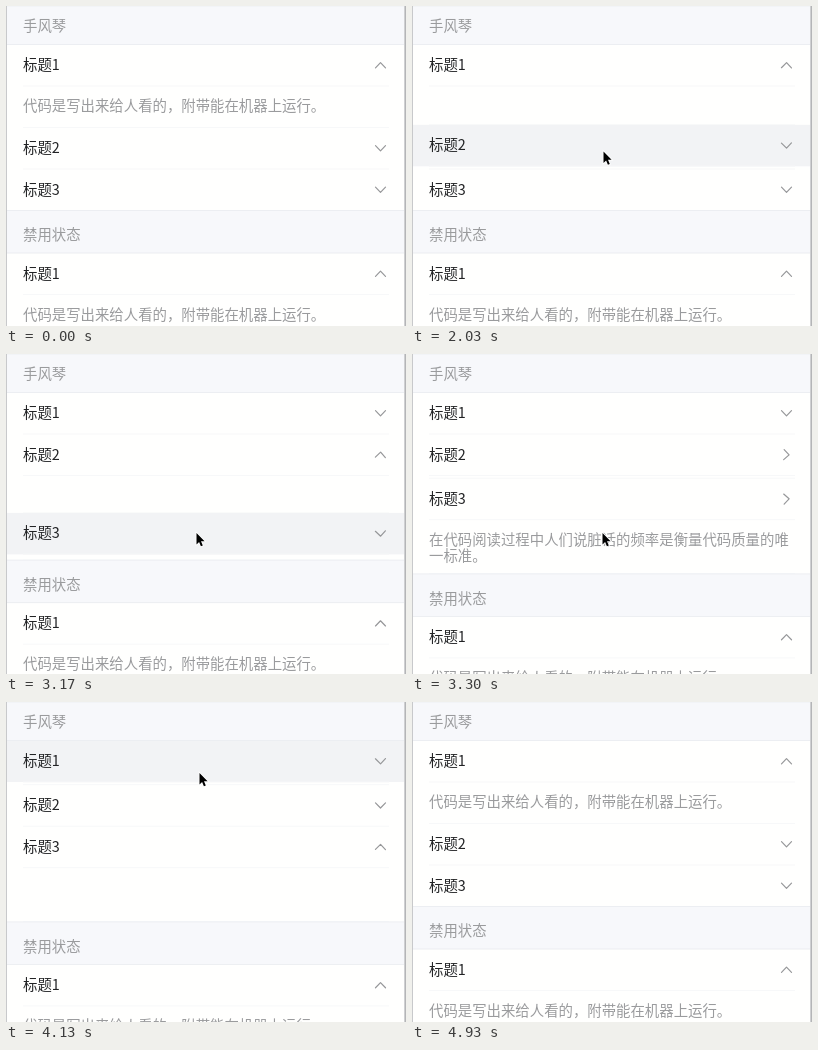
Write an HTML page that moves like this. It is 400 px wide and 320 px high and loops after 5900 ms.

```html
<!DOCTYPE html>
<html lang="zh-CN">
<head>
<meta charset="utf-8">
<title>折叠面板</title>
<style>
  html, body { margin: 0; width: 100%; height: 100%; overflow: hidden; background: #fffffe; }
  svg { display: block; }
  text { font: 14.4px "Noto Sans CJK SC", "Noto Sans CJK", "Noto Sans", sans-serif; fill: #9a9b9d; }
  .title { fill: #222325; }
  .arrow { fill: none; stroke: #969799; stroke-width: 1.2; stroke-linecap: round; stroke-linejoin: round; }
</style>
</head>
<body>
<svg id="stage" width="400" height="320" viewBox="0 0 400 320"></svg>
<script>
const LOOP = 5900;
const ROW = 41.5, TOP = 38.5, LINE = 16.5, HEAD = 42.5;
const PANELS = [
  ['代码是写出来给人看的，附带能在机器上运行。'],
  ['技术无非就是那些开发它的人的共同灵魂。'],
  ['在代码阅读过程中人们说脏话的频率是衡量代码质量的唯', '一标准。']
];
const CLICKS = [
  { at: 2000, from: 0, to: 1 },
  { at: 3132, from: 1, to: 2 },
  { at: 4100, from: 2, to: 0 }
];
const SLIDE = 200, TURN = 300, TURN_DELAY = 16, PRESS = 100;

const smooth = u => u * u * (3 - 2 * u);
const easeOut = u => 1 - (1 - u) ** 3;
const easeIn = u => u * u;
const clamp = u => Math.min(1, Math.max(0, u));

// Pointer moves: start time, end time, start point, end point, easing
const MOVES = [
  [715, 1230, [371, 122], [191.5, 145.5], easeOut],
  [2650, 2900, [191.5, 145.5], [190.5, 179], smooth],
  [3450, 3930, [190.5, 179], [193.5, 71], easeOut],
  [4240, 4400, [193.5, 71], [194.3, 103.3], smooth],
  [4400, 4700, [194.3, 103.3], [195, 119], easeOut],
  [4700, 4930, [195, 119], [378, 150], easeIn]
];
const SHOWN = [730, 4930];

const stage = document.getElementById('stage');

function add(parent, tag, attrs = {}, content = '') {
  const node = document.createElementNS('http://www.w3.org/2000/svg', tag);
  for (const key in attrs) node.setAttribute(key, attrs[key]);
  node.textContent = content;
  return parent.appendChild(node);
}
const rect = (parent, x, y, width, height, fill) => add(parent, 'rect', { x, y, width, height, fill });
const label = (parent, middle, content, cls = '') =>
  add(parent, 'text', { x: 17, y: middle + 4.8, class: cls }, content);
const divider = (parent, y) => rect(parent, 17, y - 0.5, 366, 1, '#f7f8f9');
const shift = (node, y) => node.setAttribute('transform', `translate(0 ${y})`);
const show = (node, on) => node.setAttribute('visibility', on ? 'visible' : 'hidden');

function header(parent, top, height, middle, content) {
  rect(parent, 0, top, 398, height, '#f7f8fb');
  rect(parent, 0, top - 0.5, 398, 1, '#eceef2');
  rect(parent, 0, top + height - 0.5, 398, 1, '#eceef2');
  label(parent, middle, content);
}

function makePanel(parent, name, lines) {
  const group = add(parent, 'g');
  const press = rect(group, 0, 0, 398, ROW, '#f2f3f5');
  const line = divider(group, ROW);
  label(group, ROW / 2, name, 'title');
  const arrow = add(group, 'path', { d: 'M-2.6 -5L2.6 0L-2.6 5', class: 'arrow' });
  const body = add(group, 'svg', { x: 0, y: ROW, width: 400, overflow: 'hidden' });
  const words = add(body, 'g');
  lines.forEach((content, i) => label(words, 20.5 + i * LINE, content));
  const full = ROW + (lines.length - 1) * LINE;
  const bottom = divider(group, 0);
  return { group, press, line, arrow, body, words, bottom, full };
}

// Returns the y where the next panel begins
function drawPanel(panel, top, { open, turn, pressed, closing }) {
  const height = panel.full * open;
  shift(panel.group, top);
  show(panel.press, pressed);
  show(panel.line, open > 0);
  show(panel.words, !closing);
  panel.arrow.setAttribute('transform', `translate(374.5 ${ROW / 2}) rotate(${90 - 180 * turn})`);
  panel.body.setAttribute('height', height);
  panel.bottom.setAttribute('y', ROW + height - 0.5);
  return top + ROW + height;
}

const panels = PANELS.map((lines, i) => makePanel(stage, `标题${i + 1}`, lines));
header(stage, 0, TOP, 20.5, '手风琴');
const lower = add(stage, 'g');
header(lower, 0, HEAD, 25, '禁用状态');
drawPanel(makePanel(lower, '标题1', PANELS[0]), HEAD, { open: 1, turn: 1 });

rect(stage, 0, 0, 1, 320, '#c8c9cb');
rect(stage, 398, 0, 1, 320, '#cfd0d2');
rect(stage, 399, 0, 1, 320, '#b4b5b7');
const pointer = add(stage, 'path', {
  d: 'M0 0V11.4L2.6 8.9L4.4 13.3L6.3 12.5L4.5 8.2H8.1Z',
  fill: '#000', stroke: '#fff', 'stroke-width': 1.6, 'paint-order': 'stroke'
});

// How far a panel is open, for a transition of given delay and length
function openness(index, t, delay, length) {
  const last = CLICKS.filter(c => t >= c.at).pop();
  if (!last) return index === 0 ? 1 : 0;
  if (index !== last.from && index !== last.to) return 0;
  const u = smooth(clamp((t - last.at - delay) / length));
  return index === last.to ? u : 1 - u;
}

const clicked = (role, index, t, length) =>
  CLICKS.some(c => c[role] === index && t >= c.at && t < c.at + length);

function pointerAt(t) {
  let point = MOVES[0][2];
  for (const [start, end, a, b, ease] of MOVES) {
    if (t < start) break;
    const u = ease(clamp((t - start) / (end - start)));
    point = a.map((v, i) => v + (b[i] - v) * u);
  }
  return point;
}

function render(t) {
  let y = TOP;
  panels.forEach((panel, i) => {
    y = drawPanel(panel, y, {
      open: openness(i, t, 0, SLIDE),
      turn: openness(i, t, TURN_DELAY, TURN),
      pressed: clicked('to', i, t, PRESS),
      closing: clicked('from', i, t, SLIDE)
    });
  });
  shift(lower, y);
  pointer.setAttribute('transform', `translate(${pointerAt(t)})`);
  show(pointer, t >= SHOWN[0] && t < SHOWN[1]);
}

const began = performance.now();
function tick() {
  render((performance.now() - began) % LOOP);
  requestAnimationFrame(tick);
}
tick();
</script>
</body>
</html>
```
